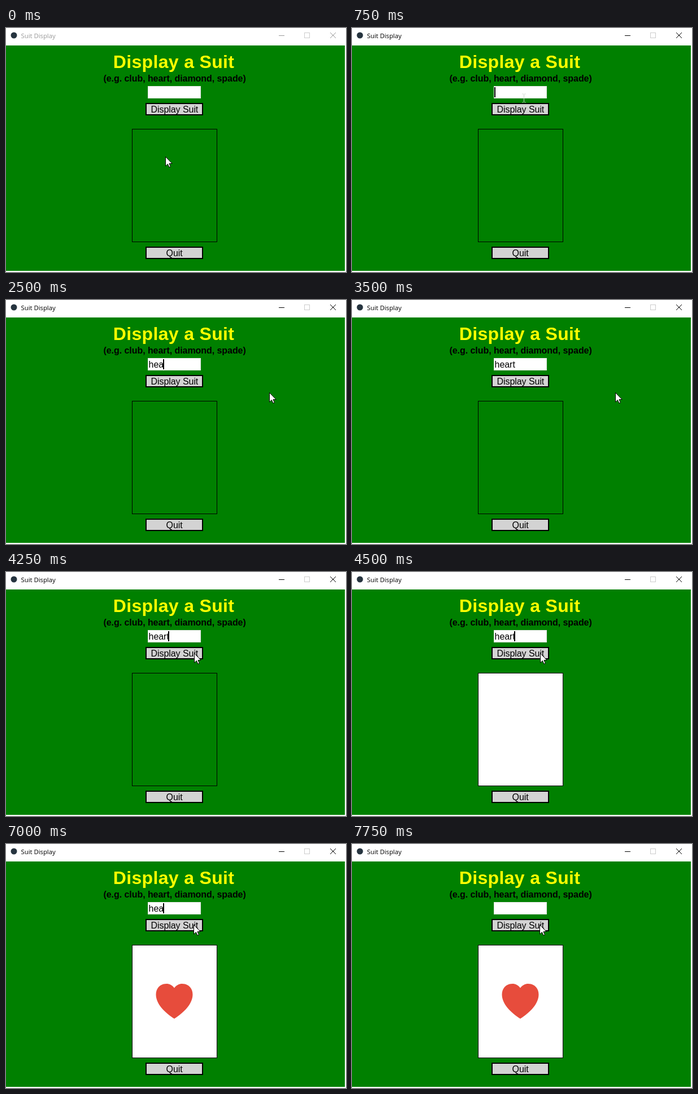
Write an HTML page that moves like this. It is 602x433 px and loops after 8000 ms.

```html
<!DOCTYPE html>
<html lang="en">
<head>
<meta charset="utf-8">
<title>Suit Display</title>
<style>
html, body { margin: 0; width: 100%; height: 100%; overflow: hidden; background: #fff; }
svg { display: block; width: 602px; height: 433px; }
text { font: 16px "Liberation Sans", Arial, sans-serif; white-space: pre; }
.caption { font: 11.3px "Open Sans", "Noto Sans", sans-serif; }
.heading { font-size: 32px; font-weight: bold; letter-spacing: .33px; fill: #ff0; }
.hint { font-weight: bold; letter-spacing: -.06px; }
.label { letter-spacing: -.06px; }
.button { fill: #d3d3d3; stroke: #000; stroke-width: 2; }
.crisp { shape-rendering: crispEdges; }
</style>
</head>
<body>
<svg viewBox="0 0 602 433">
  <rect width="602" height="433" fill="#fff"/>
  <rect y="31" width="600" height="400" fill="#008000"/>

  <circle cx="14" cy="13" r="5.5" fill="#26343f"/>
  <text id="caption" class="caption" x="26.5" y="18">Suit Display</text>
  <rect x="528.5" y="8.5" width="9" height="9" fill="none" stroke="#ccc"/>
  <path id="controls" d="M483 13.5H493M574 8L584 18M584 8L574 18" fill="none"/>

  <text class="heading" x="189.8" y="71">Display a Suit</text>
  <text class="hint" x="172.5" y="95">(e.g. club, heart, diamond, spade)</text>

  <rect x="251.5" y="103.5" width="93" height="21" fill="#fff" stroke="#e6e6e6"/>
  <text id="entry" class="label" x="252.6" y="120"></text>
  <rect id="caret" class="crisp" y="105" width="2" height="18"/>

  <rect class="button" x="248" y="134" width="100" height="20"/>
  <text class="label" x="256.5" y="150">Display Suit</text>
  <rect class="button" x="248" y="389" width="100" height="20"/>
  <text class="label" x="283.5" y="405">Quit</text>

  <rect id="card" x="223.5" y="179.5" width="150" height="200" stroke="#000"/>
  <path id="heart" fill="#e74c3c" d="M298 255.5C294.500 250.500 289.500 248 284 248C273 248 265.500 256 265.500 267C265.500 284 281 299 298 310C315 299 330.500 284 330.500 267C330.500 256 323 248 312 248C306.500 248 301.500 250.500 298 255.500Z"/>

  <path id="arrow" d="M0 0V16.500L3.900 12.900L6.400 18.700L8.900 17.600L6.500 12H11.600Z" fill="#fff" stroke="#000"/>
  <path id="beam" d="M-3 .5H-1M1 .5H3M0 1V15M-3 15.500H-1M1 15.500H3" fill="none" stroke="#c9d3c9"/>
</svg>
<script>
const LOOP = 8000, STEP = 250, WORD = "heart";
const CARET_X = [252, 261, 270, 278, 283, 287];
const el = id => document.getElementById(id);
const [caption, controls, entry, caret, card, heart, arrow, beam] =
  ["caption", "controls", "entry", "caret", "card", "heart", "arrow", "beam"].map(el);

// time, x, y, shape
const pointer = [
  [0, 282, 228, "arrow"],
  [250, 292, 184, "arrow"],
  [500, 304, 116, "beam"],
  [1000, 398, 142, "arrow"],
  [1250, 466, 164, "arrow"],
  [4000, 410, 156, "arrow"],
  [4250, 333, 144, "arrow"],
  [5250, 332, 143, "arrow"]
];

// times at which the caret turns on and off
const blinks = [[750, 1500], [2000, 3500], [4000, 5000], [5250, 5750], [6250, 7750]];

const show = (node, on) => node.setAttribute("visibility", on ? "visible" : "hidden");
const clamp = n => Math.max(0, Math.min(WORD.length, n));
const stepsSince = (t, start) => clamp(Math.floor((t - start) / STEP) + 1);

function draw(t) {
  const active = t >= 750;
  caption.setAttribute("fill", active ? "#000" : "#999");
  controls.setAttribute("stroke", active ? "#000" : "#999");

  const count = stepsSince(t, 2000) - stepsSince(t, 6750);
  entry.textContent = WORD.slice(0, count);
  caret.setAttribute("x", CARET_X[count]);
  show(caret, blinks.some(([on, off]) => t >= on && t < off));

  card.setAttribute("fill", t >= 4500 ? "#fff" : "none");
  show(heart, t >= 4750);

  const [, x, y, shape] = pointer.filter(p => p[0] <= t).pop();
  const node = shape === "beam" ? beam : arrow;
  show(arrow, node === arrow);
  show(beam, node === beam);
  node.setAttribute("transform", `translate(${x + .5} ${y + .5})`);
}

const start = performance.now();
function tick() {
  draw((performance.now() - start) % LOOP);
  requestAnimationFrame(tick);
}
tick();
</script>
</body>
</html>
```
